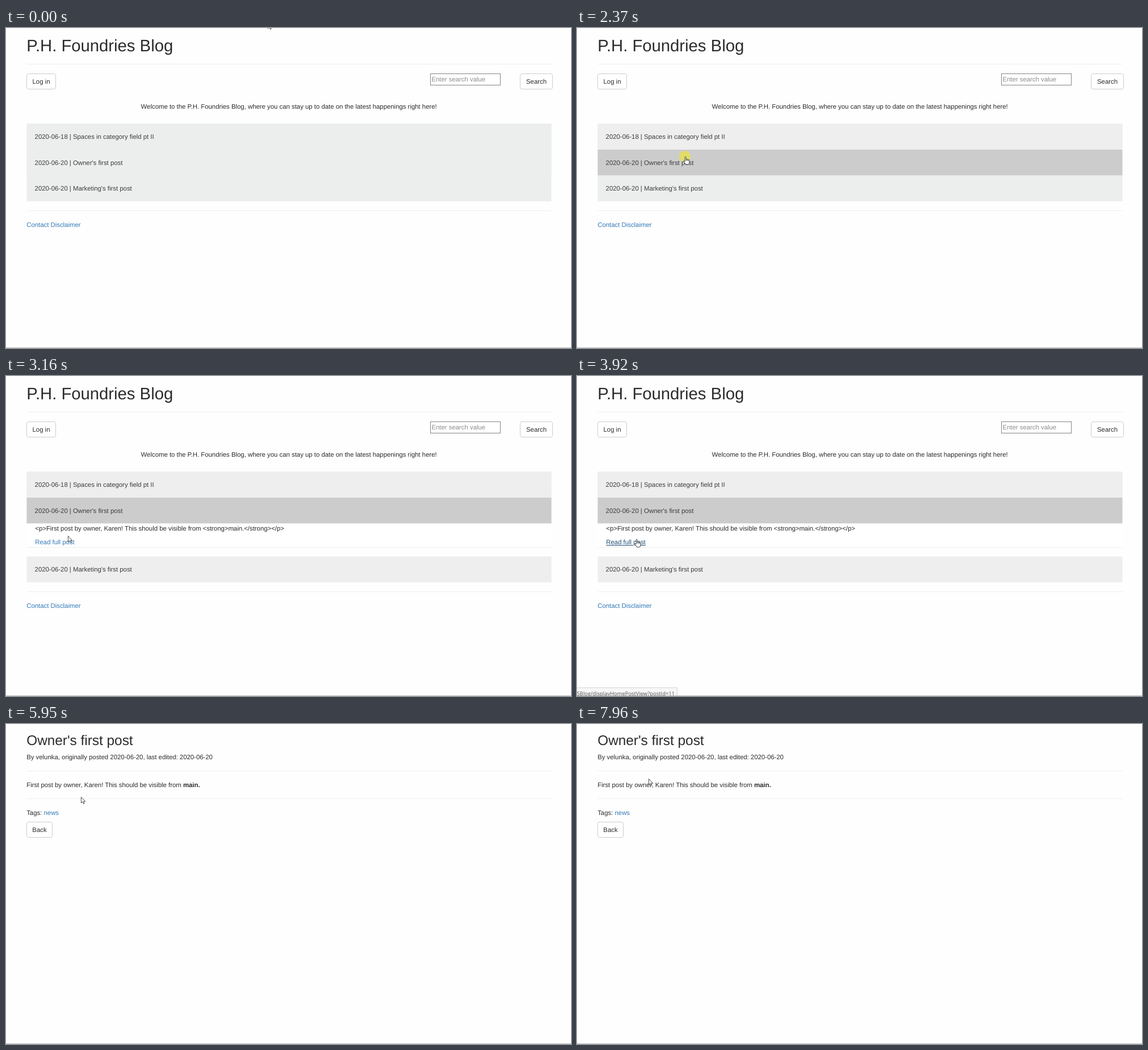
Animation of 995 by 563 pixels, one loop 8 s. Source, as an HTML page:

```html
<!DOCTYPE html>
<html lang="en">
<head>
<meta charset="utf-8">
<title>Blog walkthrough</title>
<style>
  html, body { margin: 0; width: 100%; height: 100%; overflow: hidden; background: #fefefe; }
  svg { display: block; width: 100vw; height: 100vh; }
  text { font: 11.375px "Liberation Sans", Arial, sans-serif; fill: #2b2b2b; text-rendering: geometricPrecision; white-space: pre; }
  .h1 { font-size: 29.25px; }
  .h2 { font-size: 24.375px; }
  .row { fill: #3c3c3c; }
  .mid { text-anchor: middle; }
  .link { fill: #337ab7; }
  .link.hover { fill: #23527c; text-decoration: underline; }
  .hint { fill: #8c8c8c; }
  .rule { fill: #eee; }
  .btn { fill: #fff; stroke: #ccc; }
  .url { font: 9.4px "Open Sans", "Noto Sans", sans-serif; fill: #555; }
  .pointer { fill: #fff; stroke: #2b2b2b; stroke-width: .85; stroke-linejoin: round; }
</style>
</head>
<body>
<svg id="stage" viewBox="0 0 995 563" xmlns="http://www.w3.org/2000/svg"></svg>
<script>
const LOOP = 8000, START = 890, STEP = 77.7;

// Moments in steps after START
const HOVER_FIRST = 7, HOVER_SECOND = 11, OPEN = 22, STATUS = 31, POST = 45;
const CLICKS = [[19, 22], [36, 39]];

// Pointer path: step, x, y
const PATH = [
  [-1, 461, -10], [2, 415, 50], [5, 320, 125], [8, 240, 180], [11, 208, 215],
  [16, 190, 226], [23, 190, 226], [26, 157, 246], [29, 109, 281], [31, 104, 287],
  [59, 104, 287], [62, 116, 225], [65, 132, 128], [67, 152, 95], [70, 72, 72],
  [71, 70, 64], [74, 108.5, 64], [80, 108.5, 64], [83, 180, 57], [86, 256, 57],
  [89, 175, 82], [91, 126, 96]
];

const text = (x, y, s, cls = '', id = '') =>
  `<text x="${x}" y="${y}" class="${cls}" id="${id}">${s}</text>`;
const rule = y => `<rect class="rule" x="36.5" y="${y}" width="924" height="1"/>`;
const button = (x, y, w, s) =>
  `<rect class="btn" x="${x}" y="${y}" width="${w}" height="27" rx="3.2"/>` +
  text(x + w / 2, y + 17.3, s, 'mid');
const row = (id, y, s) =>
  `<rect id="${id}" x="36.5" y="${y}" width="924" height="45.5"/>` + text(50.6, y + 26.7, s, 'row');

const stage = document.getElementById('stage');
stage.innerHTML = `
<rect width="995" height="563" fill="#fefefe"/>
<g id="home">
  ${text(36.2, 41, 'P.H. Foundries Blog', 'h1')}
  ${rule(63)}
  ${button(36.5, 80.5, 51, 'Log in')}
  <rect x="747.5" y="80.5" width="123" height="20" fill="#fff" stroke="#858585"/>
  ${text(749.4, 94, 'Enter search value', 'hint')}
  ${button(905.5, 80.5, 57, 'Search')}
  ${text(237.6, 142, 'Welcome to the P.H. Foundries Blog, where you can stay up to date on the latest happenings right here!')}
  <rect x="36.5" y="168.5" width="924" height="91" fill="#eee"/>
  ${row('row1', 168.5, '2020-06-18 | Spaces in category field pt II')}
  ${row('row2', 214, "2020-06-20 | Owner's first post")}
  <g id="panel">
    <rect x="36.5" y="259.5" width="924" height="42" fill="#fff"/>
    ${rule(301)}
    ${text(51.3, 271.6, '&lt;p&gt;First post by owner, Karen! This should be visible from &lt;strong&gt;main.&lt;/strong&gt;&lt;/p&gt;')}
    ${text(51.3, 296.4, 'Read full post', 'link', 'more')}
  </g>
  <g id="below">
    ${row('row3', 259.5, "2020-06-20 | Marketing's first post")}
    ${rule(321)}
    ${text(36.2, 349.6, 'Contact Disclaimer', 'link')}
  </g>
</g>
<g id="post">
  ${text(36.2, 37, "Owner's first post", 'h2')}
  ${text(36.2, 61.6, 'By velunka, originally posted 2020-06-20, last edited: 2020-06-20')}
  ${rule(82)}
  ${text(36.2, 110.8, 'First post by owner, Karen! This should be visible from <tspan font-weight="bold">main.</tspan>')}
  ${rule(131)}
  ${text(36.2, 160, 'Tags: <tspan class="link">news</tspan>')}
  ${button(36.5, 172.5, 45, 'Back')}
</g>
<g id="status">
  <rect id="bar" x="-1.5" y="548.5" height="16" fill="#f7f7f7" stroke="#d4d4d4"/>
  ${text(-.3, 561.6, 'SBlog/displayHomePostView?postId=11', 'url', 'url')}
</g>
<rect y="562" width="995" height="1" fill="#b8b8b8"/>
<g id="cursor">
  <circle id="halo" r="10" fill="#e6e14a" opacity=".8"/>
  <path id="arrow" class="pointer" d="M.4 .6V11L2.8 8.8L4.5 12.4L6.1 11.7L4.5 8.2H7.7Z"/>
  <path id="hand" class="pointer" d="M0 9V1.4Q0 .3 1 .3T2 1.4V5Q3 4.2 4 5.3Q5.2 4.7 5.9 5.8Q7.6 5.3 7.8 7V10.4Q7.6 12 6.6 14H1.4Q.5 12.2 -2 9.2Q-2.5 7.6 -1.2 7.7ZM2 5V7.6M4 5.3V7.8M5.9 5.8V8"/>
  <path id="beam" d="M-2 -6.5H-.6L0 -6L.6 -6.5H2M0 -6V6M-2 6.5H-.6L0 6L.6 6.5H2" fill="none" stroke="#333" stroke-width=".9"/>
</g>`;

const el = {};
stage.querySelectorAll('[id]').forEach(n => { if (n.id) el[n.id] = n; });

const clamp = v => Math.max(0, Math.min(1, v));
const show = (node, on) => node.setAttribute('display', on ? 'inline' : 'none');
const grey = v => `rgb(${[v, v, v].map(Math.round)})`;
const shade = amount => grey(238 - 34 * amount);

// Cubic through the path points, at rest where the pointer pauses
function slope(i, c) {
  const a = PATH[i - 1], p = PATH[i], b = PATH[i + 1];
  if (!a || !b || (p[1] === a[1] && p[2] === a[2]) || (p[1] === b[1] && p[2] === b[2])) return 0;
  return (b[c] - a[c]) / (b[0] - a[0]);
}

function pointerAt(k) {
  const last = PATH.length - 1;
  if (k >= PATH[last][0]) return PATH[last].slice(1);
  const i = PATH.findIndex(p => p[0] > k) - 1;
  if (i < 0) return PATH[0].slice(1);
  const p = PATH[i], q = PATH[i + 1], d = q[0] - p[0], u = (k - p[0]) / d;
  return [1, 2].map(c =>
    p[c] + (q[c] - p[c]) * u * u * (3 - 2 * u) +
    d * u * (1 - u) * (slope(i, c) * (1 - u) - slope(i + 1, c) * u));
}

function pointerKind(k, x, y) {
  const within = (l, t, r, b) => x >= l && x <= r && y >= t && y <= b;
  if (k >= POST) {
    return within(36, 50, 363, 66) || within(36, 99, 341, 115) ? 'beam' : 'arrow';
  }
  if (within(36, 168.5, 960, 259.5)) return 'hand';
  if (k >= OPEN) {
    if (within(51, 285, 121, 300)) return 'hand';
    if (within(51, 260, 490, 276)) return 'beam';
  }
  return within(237, 130, 759, 146) ? 'beam' : 'arrow';
}

function render(t) {
  const k = t < START ? -1 : Math.floor((t - START + 10) / STEP);
  const open = k >= OPEN, post = k >= POST;
  const [x, y] = pointerAt(k);
  const kind = pointerKind(k, x, y);

  show(el.home, !post);
  show(el.post, post);
  show(el.panel, open);
  el.below.setAttribute('transform', `translate(0 ${open ? 58 : 0})`);

  const first = clamp((k - HOVER_FIRST) / 5) * clamp((HOVER_SECOND + 5 - k) / 5);
  const second = clamp((k - HOVER_SECOND + 1) / 6);
  el.row1.setAttribute('fill', k < HOVER_FIRST ? '#eceeed' : shade(first));
  el.row2.setAttribute('fill', k < HOVER_SECOND ? '#eceeed' : shade(second));
  el.row3.setAttribute('fill', open ? '#eee' : '#eceeed');
  el.more.classList.toggle('hover', open && kind === 'hand' && y > 280);

  show(el.status, k >= STATUS && k <= POST);
  show(el.url, !post);
  el.bar.setAttribute('width', post ? 91 : 178);

  el.cursor.setAttribute('transform', `translate(${x.toFixed(2)} ${y.toFixed(2)})`);
  for (const name of ['arrow', 'hand', 'beam']) show(el[name], name === kind);
  show(el.halo, CLICKS.some(([a, b]) => k >= a && k < b));
}

const origin = performance.now();
function tick() {
  render((performance.now() - origin) % LOOP);
  requestAnimationFrame(tick);
}
tick();
</script>
</body>
</html>
```
